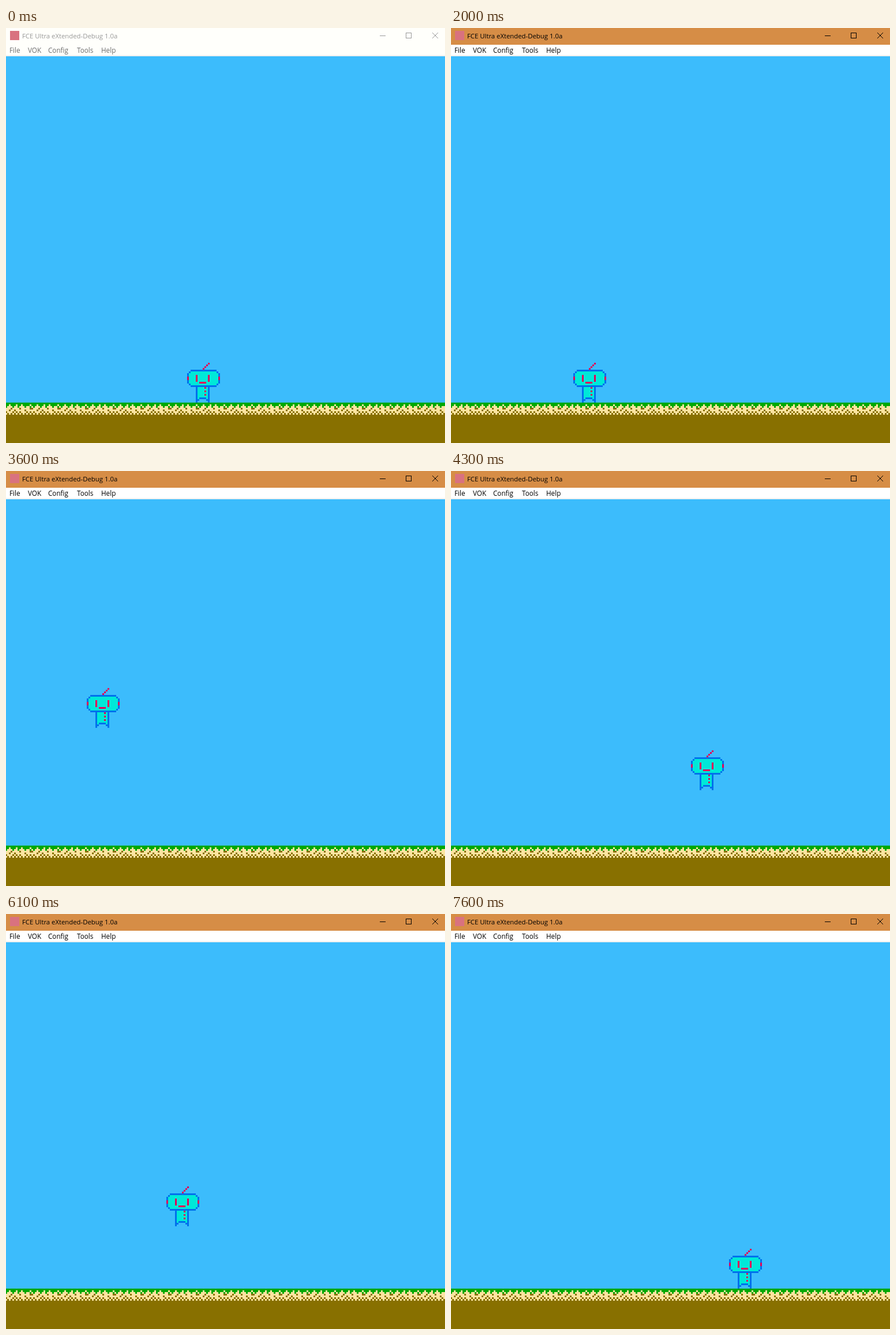
These frames come from a looping animation (761 px wide and 719 px high, 9200 ms). An HTML page with a canvas:

```html
<!DOCTYPE html>
<html lang="en">
<head>
<meta charset="utf-8">
<title>Robot platformer</title>
<style>
  html, body { margin: 0; width: 100%; height: 100%; overflow: hidden; }
  canvas { display: block; }
</style>
</head>
<body>
<canvas id="stage" width="761" height="719"></canvas>
<script>
const ctx = document.getElementById("stage").getContext("2d");
const LOOP = 9200, STEP = 100, CELL = 3;
const GROUND_Y = 649, HOME_X = 314, STAND_Y = 580;

const COLORS = {
  G: "#00a800", C: "#fce4a0", B: "#887000",
  o: "#0070ec", c: "#00e8d8", p: "#e40058"
};

const GROUND = [
  "GGGGGGGGGGGGGGGG",
  "GGCGGGCGGCGGGGCG",
  "GCCCGCCGCCCGCCGC",
  "CCCBCCCCBCCCCCBB",
  "CCBCCBCCCCCBCCCC",
  "BCCCBCBCBCCCBCBC",
  "CBCBCBCBCBCBCBCB"
];

const ROBOT = [
  "            p      ",
  "           p       ",
  "          p        ",
  "         p         ",
  "  ooooooooooooooo  ",
  " occccccccccccccco ",
  "occccccccccccccccco",
  "occccpccccccpccccco",
  "pccccpccccccpcccccp",
  "pccccpccccccpcccccp",
  "occccpccccccpccccco",
  "occccccppppccccccco",
  " occccccccccccccco ",
  "  ooooooooooooooo  ",
  "     occccpco      ",
  "     occcccco      ",
  "     occccpco      ",
  "     occcccco      ",
  "     occccpco      ",
  "     occcccco      ",
  "     ocooooco      ",
  "     oo    oo      ",
  "     o      o      "
];

// [time, left edge]
const WALK = [
  [700, 314], [1400, 44], [1500, 44], [1600, 56], [2500, 410], [2600, 404],
  [2900, 290], [3300, 134], [3400, 122], [3500, 122], [3600, 140], [4300, 416],
  [4500, 494], [4600, 536], [4700, 560], [4800, 536], [5200, 380], [5500, 254],
  [5700, 176], [5800, 164], [6100, 278], [6500, 434], [7000, 632], [7100, 644],
  [7200, 614], [7500, 494], [7600, 482]
];

// [time of apex, height in cells]
const JUMPS = [[3640, 69], [4410, 40], [5200, 40], [6100, 36], [7000, 74]];
const GRAVITY = 6.6;

function robotX(t) {
  if (t <= WALK[0][0]) return HOME_X;
  const next = WALK.findIndex(([time]) => time >= t);
  if (next < 0) return WALK[WALK.length - 1][1];
  const [t0, x0] = WALK[next - 1], [t1, x1] = WALK[next];
  const x = x0 + (x1 - x0) * (t - t0) / (t1 - t0);
  return HOME_X + Math.round((x - HOME_X) / 6) * 6;
}

function robotY(t) {
  const heights = JUMPS.map(([apex, h]) => h - GRAVITY * ((t - apex) / STEP) ** 2);
  return STAND_Y - Math.round(Math.max(0, ...heights)) * CELL;
}

function rect(color, x, y, w, h) {
  ctx.fillStyle = color;
  ctx.fillRect(x, y, w, h);
}

function drawCells(rows, left, top) {
  rows.forEach((row, j) => [...row].forEach((key, i) => {
    if (COLORS[key]) rect(COLORS[key], left + i * CELL, top + j * CELL, CELL, CELL);
  }));
}

function label(text, x, y, size, color) {
  ctx.font = `${size}px "Open Sans", sans-serif`;
  ctx.fillStyle = color;
  ctx.fillText(text, x, y);
}

function drawWindow(active) {
  const ink = active ? "#000" : "#999";
  const menuInk = active ? "#000" : "#6d6d6d";
  rect(active ? "#d68d46" : "#fffffb", 0, 0, 761, 29);
  rect(active ? "#fff" : "#fffffb", 0, 29, 761, 18);
  rect("#f0f0f0", 0, 47, 761, 2);
  rect("#d9727f", 7, 5, 16, 16);
  label("FCE Ultra eXtended-Debug 1.0a", 28, 18, 11.35, ink);
  [["File", 6], ["VOK", 38], ["Config", 73], ["Tools", 123], ["Help", 165]]
    .forEach(([text, x]) => label(text, x, 43, 11.7, menuInk));

  rect(ink, 648, 13, 10, 1);
  ctx.strokeStyle = ink;
  ctx.lineWidth = 1;
  ctx.strokeRect(693.5, 8.5, 9, 9);
  ctx.beginPath();
  ctx.moveTo(739, 8);
  ctx.lineTo(749, 18);
  ctx.moveTo(749, 8);
  ctx.lineTo(739, 18);
  ctx.stroke();
}

function drawGround() {
  rect(COLORS.B, 0, GROUND_Y, 761, 70);
  for (let x = -1; x < 761; x += GROUND[0].length * CELL) drawCells(GROUND, x, GROUND_Y);
}

function draw(time) {
  const t = Math.floor((time % LOOP) / STEP) * STEP;
  rect("#3cbcfc", 0, 49, 761, 600);
  drawGround();
  drawCells(ROBOT, robotX(t), robotY(t));
  drawWindow(t >= 400);
}

let start;
function tick(now) {
  start ??= now;
  draw(now - start);
  requestAnimationFrame(tick);
}
draw(0);
requestAnimationFrame(tick);
</script>
</body>
</html>
```
